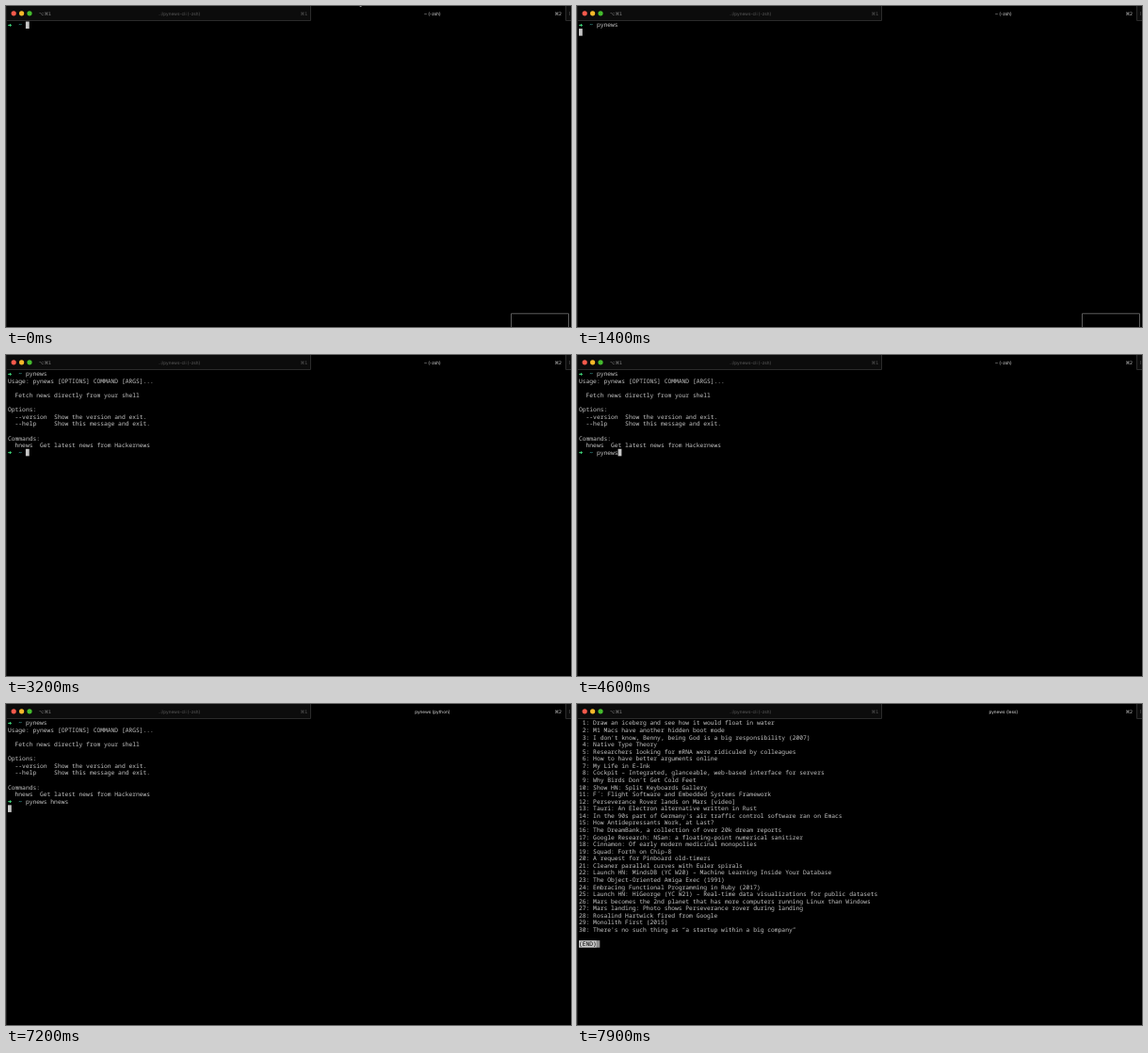
Write an HTML page that moves like this. It is 600 px wide and 341 px high and loops after 8000 ms.

```html
<!DOCTYPE html>
<html lang="en">
<head>
<meta charset="utf-8">
<title>Terminal</title>
<style>
html, body { margin: 0; width: 100%; height: 100%; overflow: hidden; background: #000; }
svg { display: block; width: 600px; height: 341px; }
text { white-space: pre; text-rendering: geometricPrecision; }
.mono { font: 6.3px "Noto Sans Mono", "DejaVu Sans Mono", monospace; fill: #c6c6c6; }
.ui { font: 4.7px Inter, "DejaVu Sans", sans-serif; }
.key { font: 4.7px "DejaVu Sans", sans-serif; }
</style>
</head>
<body>
<svg viewBox="0 0 600 341" xmlns="http://www.w3.org/2000/svg">
  <rect width="600" height="341"/>
  <rect width="323" height="15.5" fill="#0c0c0c"/>
  <rect x="594" width="6" height="15.5" fill="#0c0c0c"/>
  <path d="M0 15.5H323.5V0M594.5 0V15.5H600" fill="none" stroke="#2b2b2b"/>
  <path d="M0.5 0V341" stroke="#1c1c1c"/>
  <path d="M598.5 6V10" stroke="#333"/>
  <circle cx="8.2" cy="7.8" r="2.6" fill="#fa5a4c"/>
  <circle cx="16.6" cy="7.8" r="2.6" fill="#f5b82a"/>
  <circle cx="25" cy="7.8" r="2.6" fill="#45bd2e"/>
  <text class="key" x="35" y="9.5" fill="#8a8a8a">⌥⌘1</text>
  <text class="ui" x="184" y="9.5" fill="#5c5c5c" text-anchor="middle">..i/pynews-cli (-zsh)</text>
  <text class="key" x="312.6" y="9.5" fill="#5c5c5c">⌘1</text>
  <text class="ui" id="title" x="452.8" y="9.5" fill="#dedede" text-anchor="middle"></text>
  <text class="key" x="582.4" y="9.5" fill="#c4c4c4">⌘2</text>
  <path id="pointer" d="M375 0H378L376.8 1Z" fill="#aaa"/>
  <path id="panel" d="M536.5 341V326.8H597.5V341" fill="none" stroke="#686868" stroke-width=".9"/>
  <g id="screen"></g>
</svg>
<script>
const LOOP = 8000, CELL_W = 3.78, CELL_H = 7.57, LEFT = 2, TOP = 16.5;
const $ = id => document.getElementById(id);

const help = `Usage: pynews [OPTIONS] COMMAND [ARGS]...

  Fetch news directly from your shell

Options:
  --version  Show the version and exit.
  --help     Show this message and exit.

Commands:
  hnews  Get latest news from Hackernews`.split("\n");

const news = `Draw an iceberg and see how it would float in water
M1 Macs have another hidden boot mode
I don't know, Benny, being God is a big responsibility (2007)
Native Type Theory
Researchers looking for mRNA were ridiculed by colleagues
How to have better arguments online
My Life in E-Ink
Cockpit – Integrated, glanceable, web-based interface for servers
Why Birds Don’t Get Cold Feet
Show HN: Split Keyboards Gallery
F´: Flight Software and Embedded Systems Framework
Perseverance Rover lands on Mars [video]
Tauri: An Electron alternative written in Rust
In the 90s part of Germany's air traffic control software ran on Emacs
How Antidepressants Work, at Last?
The DreamBank, a collection of over 20k dream reports
Google Research: NSan: a floating-point numerical sanitizer
Cinnamon: Of early modern medicinal monopolies
Squad: Forth on Chip-8
A request for Pinboard old-timers
Cleaner parallel curves with Euler spirals
Launch HN: MindsDB (YC W20) – Machine Learning Inside Your Database
The Object-Oriented Amiga Exec (1991)
Embracing Functional Programming in Ruby (2017)
Launch HN: HiGeorge (YC W21) – Real-time data visualizations for public datasets
Mars becomes the 2nd planet that has more computers running Linux than Windows
Mars landing: Photo shows Perseverance rover during landing
Rosalind Hartwick fired from Google
Monolith First (2015)
There's no such thing as “a startup within a big company”`
  .split("\n").map((s, i) => String(i + 1).padStart(2) + ": " + s);

// [start ms, value]
const firstCmd = [[0, ""], [300, "p"], [400, "py"], [500, "pyne"], [600, "pynew"], [700, "pynews"]];
const secondCmd = [[0, ""], [4600, "pynews"], [5200, "pynews "], [5500, "pynews h"],
  [5600, "pynews hn"], [5700, "pynews hnew"], [5900, "pynews hnews"]];
const titles = [[0, "~ (-zsh)"], [1000, "pynews (-zsh)"], [1400, "~ (-zsh)"],
  [6300, "pynews (-zsh)"], [7100, "pynews (python)"], [7800, "pynews (less)"]];
const panelAlpha = [[0, 1], [3000, .6], [3100, .25], [3200, 0]];

const at = (steps, t) => steps.filter(s => s[0] <= t).pop()[1];
const colX = c => LEFT + c * CELL_W;
const rowY = r => TOP + r * CELL_H;
const esc = s => s.replace(/&/g, "&amp;").replace(/</g, "&lt;");

function line(s, row, col = 0, fill = "") {
  const style = fill ? ` style="fill:${fill}"` : "";
  return s && `<text class="mono" x="${colX(col)}" y="${rowY(row) + 5.9}"${style}>${esc(s)}</text>`;
}

function block(row, col, cells = 1, fill = "#c6c6c6") {
  return `<rect x="${colX(col)}" y="${rowY(row)}" width="${cells * CELL_W}" height="${CELL_H}" fill="${fill}"/>`;
}

function prompt(row, cmd) {
  const y = rowY(row) + 3.9;
  return `<path d="M2.2 ${y}H5" stroke="#3fd67a" stroke-width="1.1"/>` +
    `<path d="M4 ${y - 1.6}L6.2 ${y}L4 ${y + 1.6}Z" fill="#3fd67a"/>` +
    line("~", row, 3, "#4fd0c8") + line(cmd, row, 5);
}

function screen(t) {
  if (t >= 7400) {
    return news.map((s, i) => line(s, i)).join("") +
      block(31, 0, 5) + line("(END)", 31, 0, "#000") + block(31, 5, .9, "#8c8c8c");
  }
  const cmd1 = at(firstCmd, t);
  let out = prompt(0, cmd1);
  if (t < 1000) return out + block(0, 5 + cmd1.length);
  if (t < 1500) return out + block(1, 0);
  const cmd2 = at(secondCmd, t);
  out += help.map((s, i) => line(s, i + 1)).join("") + prompt(11, cmd2);
  return out + (t < 6300 ? block(11, 5 + cmd2.length) : block(12, 0));
}

let shown = "";
function draw(t) {
  const html = screen(t);
  if (html !== shown) $("screen").innerHTML = shown = html;
  $("title").textContent = at(titles, t);
  $("panel").setAttribute("opacity", at(panelAlpha, t));
  $("pointer").setAttribute("opacity", t < 300 ? 1 : 0);
}

function frame() {
  draw(performance.now() % LOOP);
  requestAnimationFrame(frame);
}
frame();
</script>
</body>
</html>
```
